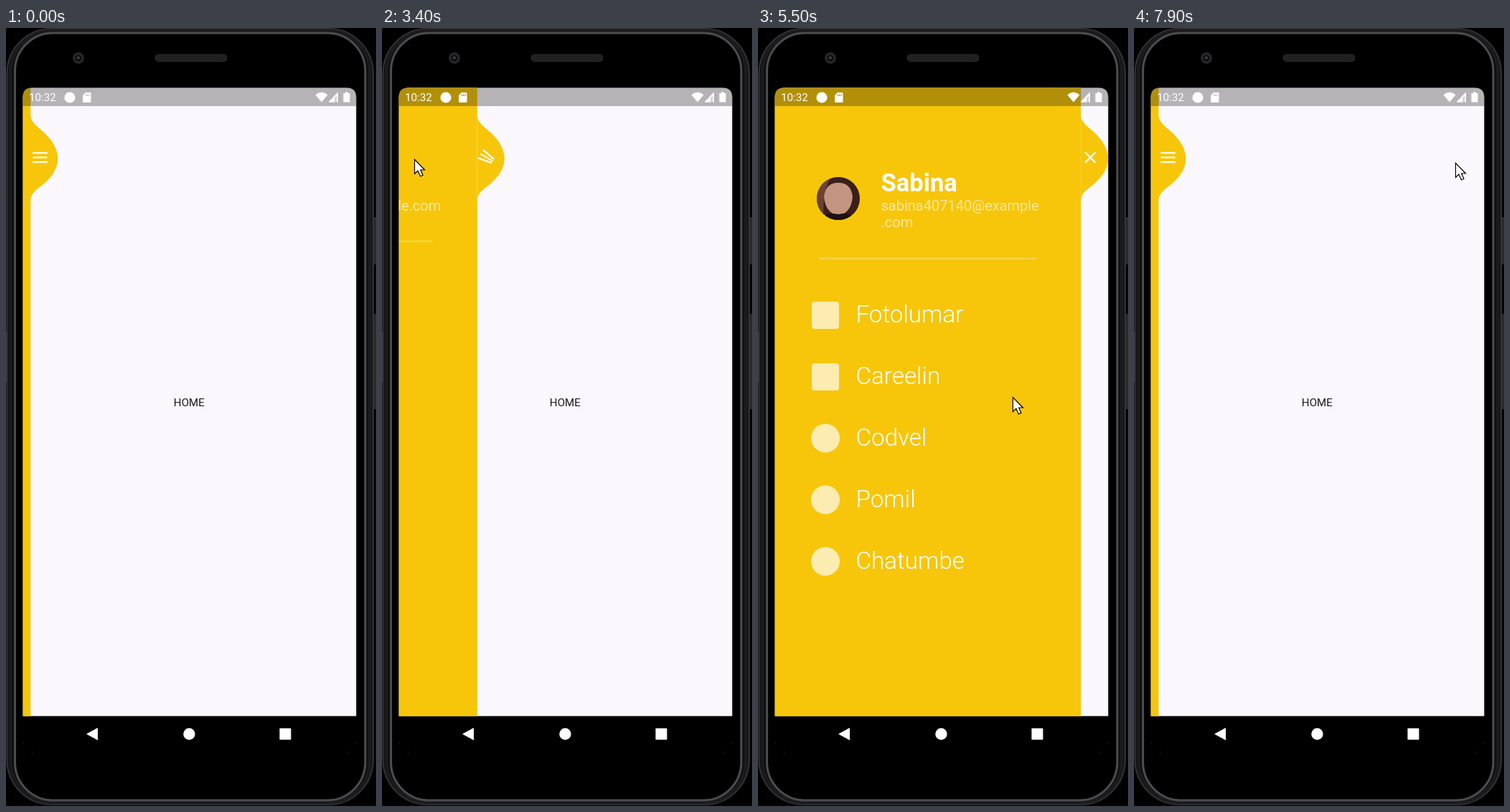
Animation of 516x1086 px, one loop 8 s. Source, as an HTML page:

```html
<!DOCTYPE html>
<html lang="en">
<head>
<meta charset="utf-8">
<title>Sidebar menu</title>
<style>
  html, body { margin: 0; width: 100%; height: 100%; overflow: hidden; background: #000; }
  svg { display: block; width: 100vw; height: 100vh; font-family: Roboto, sans-serif; }
</style>
</head>
<body>
<svg viewBox="0 0 516 1086" preserveAspectRatio="none">
  <defs>
    <clipPath id="screen"><path d="M23.6 960.4V97Q23.600 83.600 37 83.600H475Q488.400 83.600 488.400 97V960.400Z"/></clipPath>
    <clipPath id="face"><circle cx="88" cy="238" r="30"/></clipPath>
  </defs>

  <!-- phone -->
  <rect width="516" height="1086"/>
  <path d="M514.5 264V330M514.5 399V532" stroke="#2b2a2a" stroke-width="3"/>
  <path d="M.5 425V494" stroke="#4a4a4c"/>
  <g fill="none">
    <rect x="1.5" y="1" width="510.500" height="1083" rx="62" fill="#0e0e0f" stroke="#343436" stroke-width="2"/>
    <rect x="6" y="4" width="501.500" height="1077" rx="58" stroke="#1b1b1d" stroke-width="5"/>
    <rect x="12.500" y="7" width="488.500" height="1071" rx="53" fill="#000" stroke="#4c4d50" stroke-width="3"/>
  </g>
  <circle cx="101" cy="42" r="8" fill="#252527"/>
  <circle cx="101" cy="42" r="4.5" fill="#101014"/>
  <circle cx="101" cy="41.5" r="1.8" fill="#4a4a50"/>
  <rect x="208" y="37" width="100" height="9.5" rx="4.5" fill="#202021" stroke="#2e2e30"/>
  <path d="M24 998h1M36 1011h1M487 998h1M475 1011h1" stroke="#444"/>

  <!-- screen -->
  <g clip-path="url(#screen)">
    <rect x="23" y="83" width="466" height="878" fill="#faf8fc"/>
    <text x="255.4" y="527.5" font-size="15.2" text-anchor="middle" fill="#1d1c1e">HOME</text>
    <g fill="#f7c60b">
      <rect id="panel" y="83" height="878"/>
      <g id="tab">
        <path d="M-.3 121.5Q0 130 10.8 139Q36.9 159.5 38 181Q39 203 10.8 223.5Q0 232 -.3 240.5Z"/>
        <path d="M0 122V240" stroke="#fbdc6a" stroke-width=".6" id="seam"/>
        <g id="bars" transform="translate(13.2 180.700)" stroke="#fffdf4" stroke-width="2.3">
          <path d="M-10.2 0H10.2"/><path d="M-10.2 0H10.2"/><path d="M-10.2 0H10.2"/>
        </g>
      </g>
    </g>
    <g id="content" fill="#fff">
      <g clip-path="url(#face)">
        <rect x="58" y="208" width="60" height="60" fill="#3a1f1a"/>
        <path d="M58 208H78Q64 230 68 268H58Z" fill="#6d4236"/>
        <path d="M68 236Q70 216 88 216Q106 216 108 236Q106 258 88 262Q70 258 68 236Z" fill="#c39480"/>
        <path d="M66 268Q70 256 88 260Q106 256 110 268Z" fill="#1b1214"/>
      </g>
      <text x="147.5" y="227.5" font-size="34.6" font-weight="700">Sabina</text>
      <g font-size="20" fill-opacity=".6">
        <text x="147.5" y="254.5">sabina407140@example<tspan id="tail">.com</tspan></text>
      </g>
      <g id="lower">
        <path id="rule" stroke="#fff" stroke-opacity=".36" stroke-width="1.6"/>
        <g id="menu" font-size="33.2" font-weight="300"></g>
      </g>
    </g>
    <rect x="23" y="83" width="466" height="26" fill-opacity=".28"/>
  </g>

  <!-- status icons -->
  <g fill="#fff">
    <text x="32" y="102.3" font-size="15.2">10:32</text>
    <circle cx="89" cy="97" r="7.6"/>
    <path fill-rule="evenodd" d="M111 90H117Q118.5 90 118.5 91.5V102.5Q118.5 104 117 104H108.5Q107 104 107 102.5V94ZM110.5 92.5V95H111.7V92.5ZM113 92.5V95H114.2V92.5ZM115.5 92.5V95H116.7V92.5Z"/>
    <path d="M431.5 93.5Q440 86 448.5 93.5L440 103.5Z"/>
    <path d="M450 103.5L463 90V103.5Z" fill-opacity=".45"/>
    <path fill-rule="evenodd" d="M449.5 103.5L463 89.5V103.5ZM458 103.5H461.5V94L458 97.5Z"/>
    <path d="M473 89.5H477V91H479.5V103.5H470.5V91H473Z"/>
  </g>

  <!-- navigation -->
  <g fill="#fff">
    <path d="M112 985.5L128 976.8V994.2Z"/>
    <circle cx="255.5" cy="985.5" r="8.2"/>
    <rect x="381.5" y="977.5" width="16" height="16" rx="1"/>
  </g>

  <path id="cursor" d="M.5 .5V20.5L5 16.3L8.5 24L12 22.5L8.7 15H14.5Z" fill="#fff" stroke="#000" stroke-width="1.2"/>
</svg>
<script>
const LOOP = 8000, STEP = 100;
const $ = id => document.getElementById(id);
const clamp = v => Math.min(1, Math.max(0, v));

const items = [['Fotolumar', 'square'], ['Careelin', 'square'], ['Codvel', 'circle'], ['Pomil', 'circle'], ['Chatumbe', 'circle']];
$('menu').innerHTML = items.map(([name, shape], i) => {
  const y = 400.5 + 86 * i;
  const icon = shape === 'square'
    ? `<rect x="51" y="${y - 18.5}" width="38" height="38" rx="4"`
    : `<circle cx="70" cy="${y}" r="20"`;
  return `${icon} fill-opacity=".68"/><text x="112.5" y="${y + 10.5}">${name}</text>`;
}).join('');

// pointer stops: time, x, y
const stops = [
  [100, 338, 640], [900, 332, 560], [1300, 320, 500], [1800, 190, 300], [2100, 67, 173],
  [2600, 46, 180], [3100, 45, 183], [4000, 45, 183], [5000, 355, 515], [5600, 355, 515],
  [6500, 461, 179], [6800, 461, 179], [7200, 461, 181], [7900, 448, 188]
];

function pointer(t) {
  const i = stops.findIndex(s => s[0] >= t);
  const b = stops[i], a = stops[Math.max(0, i - 1)];
  const u = clamp((t - a[0]) / (b[0] - a[0] || 1));
  return [a[1] + (b[1] - a[1]) * u, a[2] + (b[2] - a[2]) * u];
}

const openness = t => clamp((t - 3298) / 431) - clamp((t - 6856) / 430);

function drawBars(p) {
  const turn = 90 * p ** 0.75;
  [...$('bars').children].forEach((bar, i) => {
    const side = i - 1;
    bar.setAttribute('transform',
      `rotate(${turn}) translate(0 ${side * 6.4 * (1 - p)}) rotate(${-side * 45 * p})`);
    if (!side) bar.setAttribute('opacity', clamp(1 - p * p * 2.5));
  });
}

function draw(t) {
  const p = openness(t), left = 24 - 464 * (1 - p), right = 450.3 - 416 * (1 - p);
  const width = right - left, oneLine = width >= 452;

  $('panel').setAttribute('x', left - 1);
  $('panel').setAttribute('width', width + 1);
  $('tab').setAttribute('transform', `translate(${right} 0)`);
  $('seam').setAttribute('opacity', p > 0 ? 0.6 : 0);
  drawBars(p);

  $('content').setAttribute('transform', `translate(${left} 0)`);
  $('rule').setAttribute('d', `M62 321.7H${width - 62}`);
  $('lower').setAttribute('transform', `translate(0 ${oneLine ? -24 : 0})`);
  const tail = $('tail');
  if (oneLine) {
    tail.removeAttribute('x');
    tail.removeAttribute('y');
  } else {
    tail.setAttribute('x', 147.5);
    tail.setAttribute('y', 278);
  }

  const cursor = $('cursor');
  cursor.setAttribute('visibility', t < 100 ? 'hidden' : 'visible');
  if (t >= 100) cursor.setAttribute('transform', `translate(${pointer(t)})`);
}

const start = performance.now();
function tick() {
  const t = (performance.now() - start) % LOOP;
  draw(Math.floor(t / STEP) * STEP);
  requestAnimationFrame(tick);
}
tick();
</script>
</body>
</html>
```
